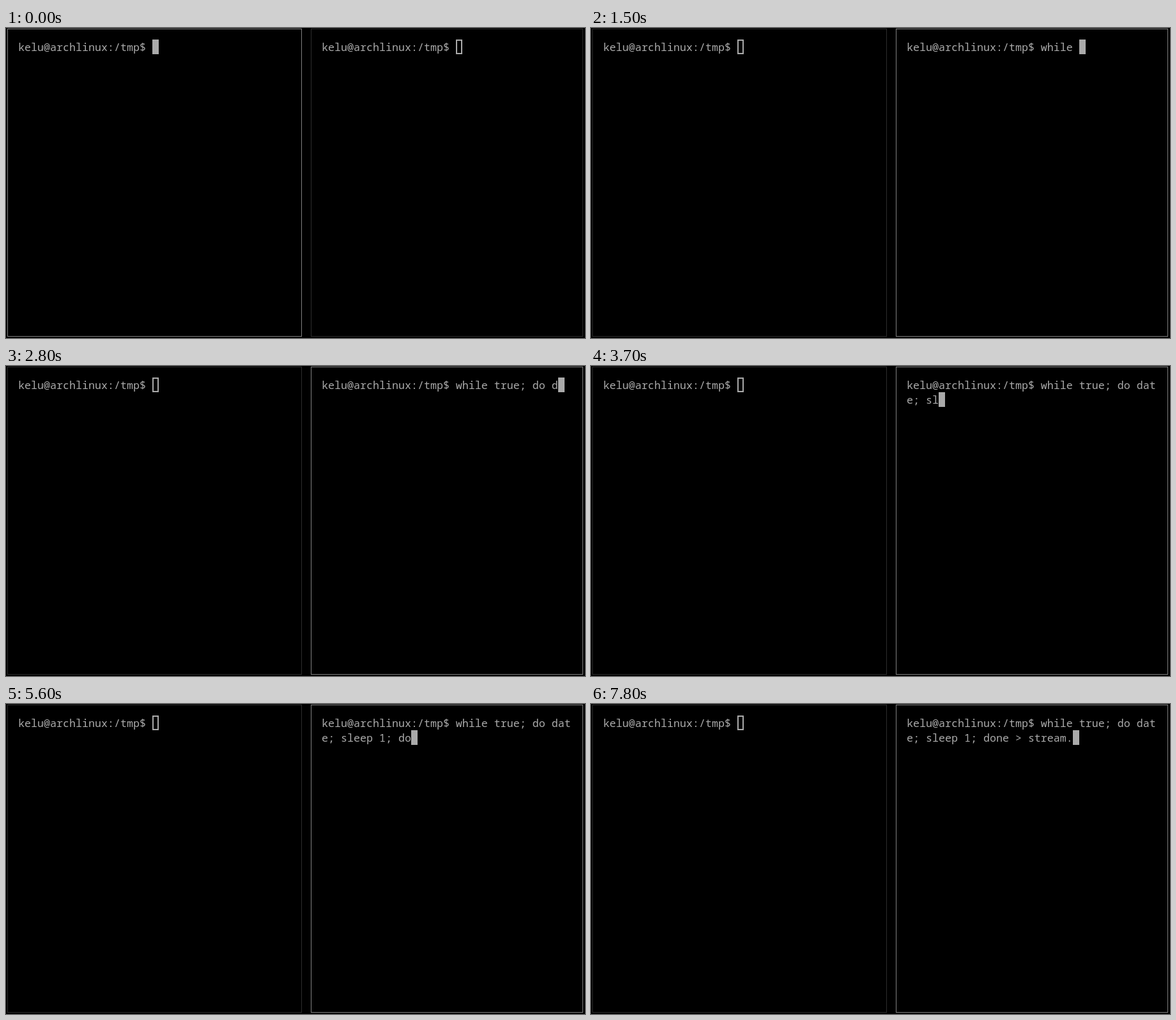
These frames come from a looping animation (906 by 485 pixels, 8000 ms). An HTML page:

```html
<!DOCTYPE html>
<html lang="en">
<head>
<meta charset="utf-8">
<title>Two terminals</title>
<style>
  html, body { margin: 0; width: 100%; height: 100%; overflow: hidden; background: #000; }
  .pane {
    position: absolute; top: 1px; height: 482px; box-sizing: border-box;
    border: 1px solid #2c2c2c; color: #aaa;
    font: 16.667px/23px "Noto Sans Mono", "DejaVu Sans Mono", monospace;
  }
  .pane.active { border-color: #808080; }
  #left { left: 2px; width: 461px; }
  #right { left: 477px; width: 426px; }
  pre { position: absolute; left: 16px; top: 16px; margin: 0; font: inherit; }
  i {
    position: absolute; width: 10px; height: 23px; box-sizing: border-box;
    border: 2px solid #aaa;
  }
  .active i { background: #aaa; }
</style>
</head>
<body>
<div class="pane" id="left"><pre></pre><i></i></div>
<div class="pane" id="right"><pre></pre><i></i></div>
<script>
const LOOP = 8000, TICK = 100, COLS = 39, CELL_W = 10, CELL_H = 23, PAD = 16;
const PROMPT = "kelu@archlinux:/tmp$ ";

// Typing bursts by start time: one character per tick, and bursts may overlap.
const BURSTS = {
  900: "w", 1100: "hi", 1200: "l", 1400: "e t", 1800: "rue; ",
  2400: "do ", 2800: "d", 3000: "at", 3100: "e", 3300: "; s", 3700: "l",
  4300: "e", 4500: "ep ", 4900: "1", 5200: ";", 5400: " done", 5800: " ",
  6100: "> s", 6900: "t", 7100: "re", 7200: "a", 7400: "m", 7800: "."
};

function typedAt(t) {
  return Object.entries(BURSTS)
    .map(([start, text]) => text.slice(0, Math.max(0, Math.floor((t - start) / TICK) + 1)))
    .join("");
}

function show(id, text, active) {
  const pane = document.getElementById(id);
  const [pre, cursor] = pane.children;
  pane.classList.toggle("active", active);
  pre.textContent = text.slice(0, COLS) + "\n" + text.slice(COLS);
  cursor.style.left = PAD + text.length % COLS * CELL_W + "px";
  cursor.style.top = PAD + Math.floor(text.length / COLS) * CELL_H + "px";
}

function draw() {
  const t = performance.now() % LOOP;
  const leftActive = t < TICK;
  show("left", PROMPT, leftActive);
  show("right", PROMPT + typedAt(t), !leftActive);
  requestAnimationFrame(draw);
}
draw();
</script>
</body>
</html>
```
